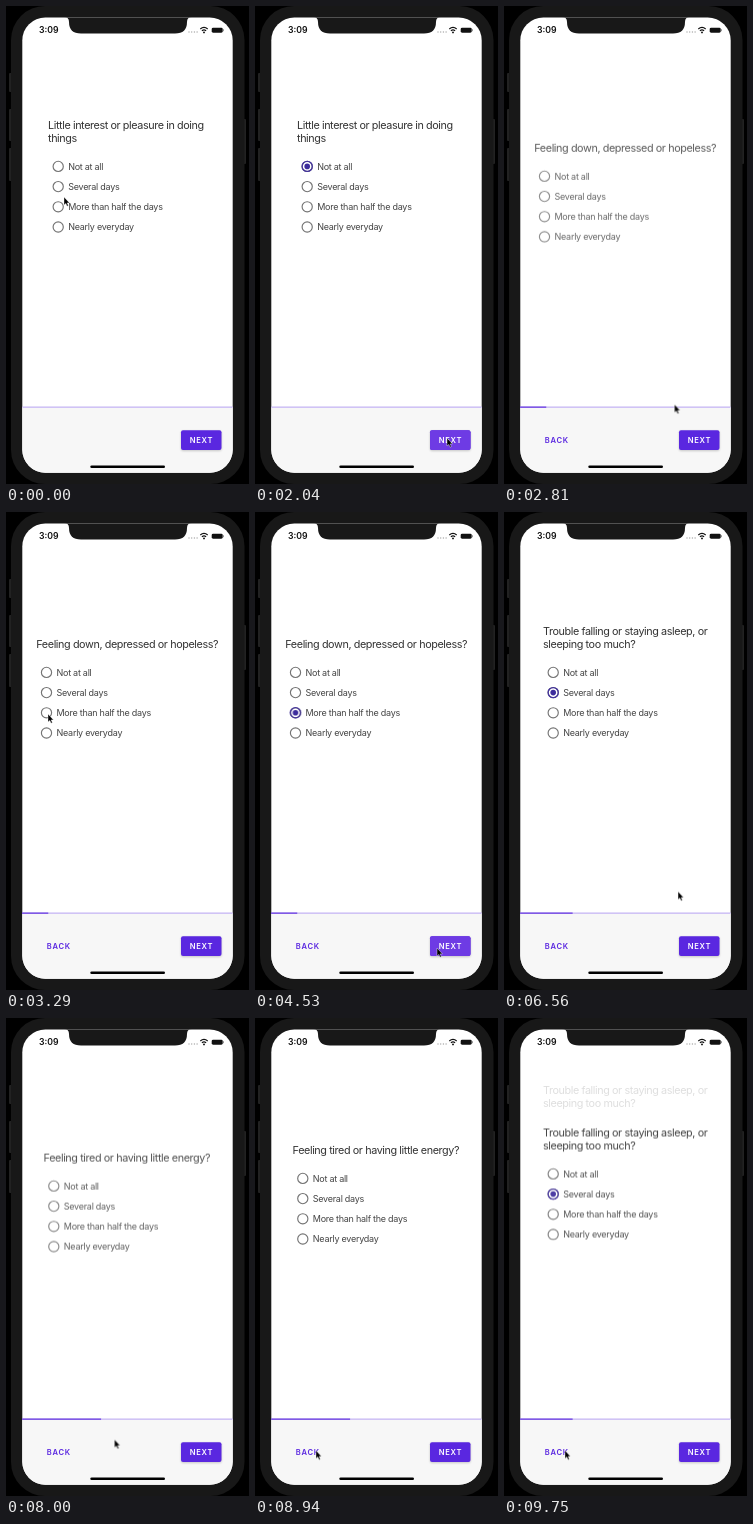
An HTML page for the animation above (9930 ms loop, 243 by 478 pixels).

```html
<!DOCTYPE html>
<html lang="en">
<head>
<meta charset="utf-8">
<title>Questionnaire</title>
<style>
html, body { margin: 0; width: 100%; height: 100%; overflow: hidden; background: #000; }
svg { display: block; width: 243px; height: 478px; font-family: Inter, Roboto, sans-serif; }
.title { font-size: 10.8px; letter-spacing: -.4px; fill: #333; }
.label { font-size: 9px; letter-spacing: -.26px; fill: #444; }
.btn { font-size: 7.6px; font-weight: 600; letter-spacing: .75px; }
.ring { fill: none; stroke: #747474; stroke-width: 1.15; }
.picked { fill: none; stroke: #43329f; stroke-width: 1.25; }
.dot { fill: #3d2c9c; }

/* All timelines share one 9930 ms loop */
.anim { animation: 9930ms linear infinite; }
.step { animation-timing-function: step-end; }

#q1 { animation-name: q1; }
#q2 { animation-name: q2; }
#q3 { animation-name: q3; }
#q4 { animation-name: q4; }
#pick1 { animation-name: pick1; }
#pick2 { animation-name: pick2; }
#pick3 { animation-name: pick3; }
#trail { animation-name: trail; }
#ripple { animation-name: ripple; transform-origin: 52.2px 160.4px; }
#bar { animation-name: bar; transform-origin: 16px 0; }
#back { animation-name: back; }
#nextHover { animation-name: nextHover; }
#press { animation-name: press; }
#cursor { animation-name: cursor; animation-timing-function: ease-in-out; }

@keyframes q1 {
  0%, 22.16% { opacity: 1; }
  24.67%, 100% { opacity: 0; }
}
@keyframes q2 {
  0%, 26.25% { opacity: 0; transform: translateY(50px); animation-timing-function: cubic-bezier(.215,.61,.355,1); }
  31.28%, 49.45% { opacity: 1; transform: none; }
  51.96%, 100% { opacity: 0; transform: none; }
}
@keyframes q3 {
  0%, 53.47% { opacity: 0; transform: translateY(50px); animation-timing-function: cubic-bezier(.215,.61,.355,1); }
  58.51%, 74.42% { opacity: 1; transform: none; }
  76.94% { opacity: 0; transform: none; animation-timing-function: step-end; }
  94.86% { opacity: 0; transform: translateY(-50px); animation-timing-function: cubic-bezier(.25,.6,.6,.9); }
  98.19%, 100% { opacity: .92; transform: translateY(-4.5px); }
}
@keyframes q4 {
  0%, 78.25% { opacity: 0; transform: translateY(50px); animation-timing-function: cubic-bezier(.215,.61,.355,1); }
  83.28%, 90.13% { opacity: 1; transform: none; }
  92.65%, 100% { opacity: 0; transform: none; }
}
@keyframes pick1 { 0% { opacity: 0; } 10.07%, 100% { opacity: 1; } }
@keyframes pick2 { 0% { opacity: 0; } 36.15%, 100% { opacity: 1; } }
@keyframes pick3 { 0% { opacity: 0; } 62.74%, 100% { opacity: 1; } }
@keyframes trail { 0% { opacity: 0; } 95.07%, 100% { opacity: .16; } }
@keyframes ripple {
  0%, 10% { opacity: 0; transform: scale(.5); }
  11.5% { opacity: .12; transform: none; }
  15.8%, 100% { opacity: 0; transform: none; }
}
@keyframes bar {
  0%, 22.16% { transform: scaleX(0); }
  25.18%, 49.45% { transform: scaleX(.125); }
  52.37%, 74.42% { transform: scaleX(.25); }
  77.44%, 90.13% { transform: scaleX(.375); }
  93.15%, 100% { transform: scaleX(.25); }
}
@keyframes back { 0% { opacity: 0; } 23.67%, 100% { opacity: 1; } }
@keyframes nextHover {
  0%, 18.2% { opacity: 0; }
  19%, 24% { opacity: 1; }
  25.5%, 42.8% { opacity: 0; }
  43.6%, 50.4% { opacity: 1; }
  52%, 69.3% { opacity: 0; }
  70.1%, 76% { opacity: 1; }
  77.5%, 100% { opacity: 0; }
}
@keyframes press {
  0%, 48.3% { opacity: 0; }
  49.2%, 50.2% { opacity: .28; }
  52%, 73.8% { opacity: 0; }
  74.5%, 75.5% { opacity: .28; }
  77.5%, 100% { opacity: 0; }
}
@keyframes cursor {
  0%, 1.01% { transform: translate(58px, 191px); }
  7.15%, 11.5% { transform: translate(51px, 160px); }
  15.8% { transform: translate(191px, 425px); }
  18.6%, 24% { transform: translate(192px, 432px); }
  28.3% { transform: translate(170.5px, 398.5px); }
  33.1%, 37.2% { transform: translate(42px, 202px); }
  43.3% { transform: translate(184px, 432px); }
  45.6%, 50.3% { transform: translate(182px, 436px); }
  57.1% { transform: translate(50px, 186px); }
  58.1%, 63.5% { transform: translate(50px, 182px); }
  66.06% { transform: translate(174px, 379.5px); }
  69.5%, 76% { transform: translate(190px, 430px); }
  80.56% { transform: translate(108.5px, 421.5px); }
  84.7% { transform: translate(70px, 431px); }
  86.6%, 100% { transform: translate(61px, 432.5px); }
}
</style>
</head>
<body>
<svg viewBox="0 0 243 478">
  <defs>
    <g id="options">
      <g class="ring">
        <circle cx="10.2" cy="160.4" r="5.1"/>
        <circle cx="10.2" cy="180.6" r="5.1"/>
        <circle cx="10.2" cy="200.8" r="5.1"/>
        <circle cx="10.2" cy="221" r="5.1"/>
      </g>
      <g class="label">
        <text x="20.2" y="163.7">Not at all</text>
        <text x="20.2" y="183.9">Several days</text>
        <text x="20.2" y="204.1">More than half the days</text>
        <text x="20.2" y="224.3">Nearly everyday</text>
      </g>
    </g>
    <g id="mark">
      <circle class="picked" r="5.1"/>
      <circle class="dot" r="2.8"/>
    </g>
    <g id="sleep" class="title">
      <text x="0" y="123">Trouble falling or staying asleep, or</text>
      <text x="0" y="136.4">sleeping too much?</text>
    </g>
    <filter id="soft" x="-30%" y="-50%" width="160%" height="200%">
      <feGaussianBlur stdDeviation="1.3"/>
    </filter>
    <clipPath id="screen"><rect x="16.3" y="11.4" width="210.4" height="455.4" rx="23"/></clipPath>
  </defs>

  <!-- phone -->
  <rect width="243" height="478"/>
  <g fill="#222">
    <rect x="3" y="67" width="3" height="19" rx="1"/>
    <rect x="3" y="103" width="3" height="32" rx="1"/>
    <rect x="3" y="142" width="3" height="33" rx="1"/>
    <rect x="237" y="113" width="3" height="45" rx="1"/>
  </g>
  <rect x="5" y="0" width="233.5" height="478" rx="34" fill="#181818"/>
  <g clip-path="url(#screen)">
    <rect x="16" y="11" width="211" height="456" fill="#fff"/>
    <rect x="16" y="401" width="211" height="66" fill="#f7f7f7"/>
    <path d="M58 10H186V11Q181 11 181 16Q181 27.5 169 27.5H75Q63 27.5 63 16Q63 11 58 11Z" fill="#181818"/>
  </g>

  <!-- status bar -->
  <text x="33" y="27.4" font-size="8.7" font-weight="600" fill="#111">3:09</text>
  <g fill="#aaa">
    <circle cx="183" cy="26" r=".7"/><circle cx="185.7" cy="26" r=".7"/>
    <circle cx="188.4" cy="26" r=".7"/><circle cx="191.1" cy="26" r=".7"/>
  </g>
  <path d="M194.3 23Q198 19.7 201.7 23M195.9 24.9Q198 23 200.1 24.9" fill="none" stroke="#111" stroke-width="1.2"/>
  <circle cx="198" cy="26.4" r=".9"/>
  <rect x="205.7" y="21.7" width="11" height="5" rx="1.4" fill="#111"/>
  <rect x="217.2" y="23.2" width=".8" height="2" fill="#777"/>

  <!-- questions -->
  <g id="q1" class="anim">
    <circle id="ripple" class="anim" cx="52.2" cy="160.4" r="10" fill="#39289c"/>
    <g transform="translate(42)">
      <g class="title">
        <text x="0" y="123">Little interest or pleasure in doing</text>
        <text x="0" y="136.4">things</text>
      </g>
      <use href="#options"/>
      <g id="pick1" class="anim step"><use href="#mark" x="10.2" y="160.4"/></g>
    </g>
  </g>
  <g id="q2" class="anim">
    <g transform="translate(30.3)">
      <text class="title" x="0" y="136.4">Feeling down, depressed or hopeless?</text>
      <use href="#options"/>
      <g id="pick2" class="anim step"><use href="#mark" x="10.2" y="200.8"/></g>
    </g>
  </g>
  <g id="trail" class="anim step"><use href="#sleep" x="39" y="-47"/></g>
  <g id="q3" class="anim">
    <g transform="translate(39)">
      <use href="#sleep"/>
      <use href="#options"/>
      <g id="pick3" class="anim step"><use href="#mark" x="10.2" y="180.6"/></g>
    </g>
  </g>
  <g id="q4" class="anim">
    <g transform="translate(37.6)">
      <text class="title" x="0" y="136.4">Feeling tired or having little energy?</text>
      <use href="#options"/>
    </g>
  </g>

  <!-- footer -->
  <rect x="16.3" y="400.5" width="210.4" height="1.3" fill="#c6b6f4"/>
  <rect id="bar" class="anim" x="16.3" y="400.5" width="210.4" height="1.3" fill="#6d40e2"/>
  <text id="back" class="btn anim step" x="40.8" y="437" fill="#5a27e0">BACK</text>
  <rect id="press" class="anim" x="174.5" y="425.5" width="41" height="21" rx="3" filter="url(#soft)"/>
  <rect x="175" y="425" width="40.5" height="20" rx="2" opacity=".2" filter="url(#soft)"/>
  <rect x="175" y="424.2" width="40.5" height="19.8" rx="2" fill="#5a27e0"/>
  <rect id="nextHover" class="anim" x="175" y="424.2" width="40.5" height="19.8" rx="2" fill="#6e3be4"/>
  <text class="btn" x="183.7" y="437" fill="#fff">NEXT</text>
  <rect x="84.3" y="459.5" width="74.7" height="2.6" rx="1.3"/>

  <g id="cursor" class="anim">
    <path d="M0 0V8L1.8 6.4 3.1 9.2 4.4 8.6 3.1 5.9H5.5Z" stroke="#fff" stroke-width=".4"/>
  </g>
</svg>
</body>
</html>
```
